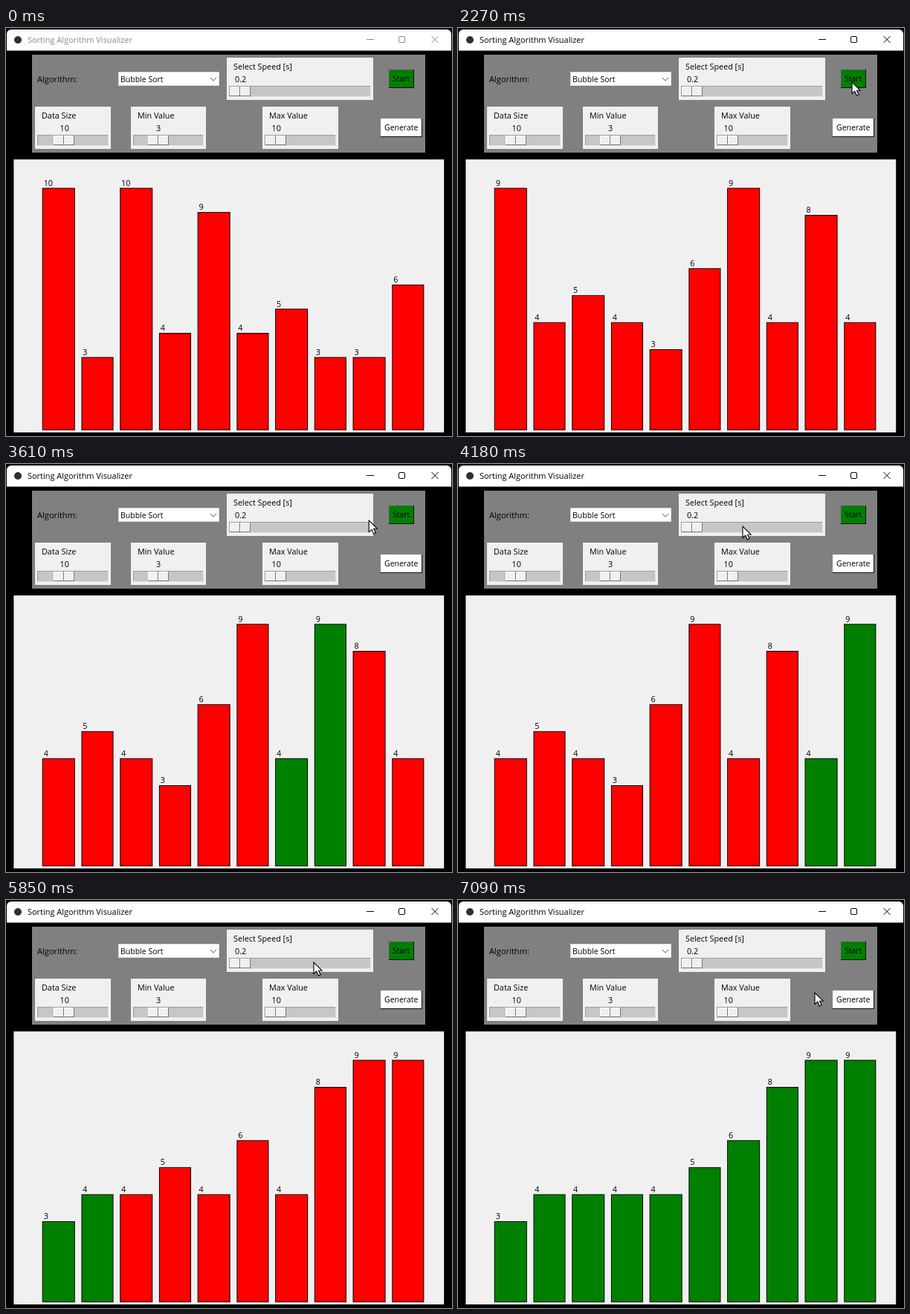
An HTML page with a canvas that plays this animation: 600x550 px, repeating every 7.18 s.

```html
<!DOCTYPE html>
<html lang="en">
<head>
<meta charset="utf-8">
<title>Sorting Algorithm Visualizer</title>
<style>
  html, body { margin: 0; width: 100%; height: 100%; overflow: hidden; background: #000; }
  canvas { display: block; width: 600px; height: 550px; }
</style>
</head>
<body>
<canvas id="stage" width="600" height="550"></canvas>
<script>
const ctx = document.getElementById('stage').getContext('2d');
const LOOP = 7180;
const FACE = '#f0f0f0';

const FIRST = [10, 3, 10, 4, 9, 4, 5, 3, 3, 6];
const SECOND = [10, 10, 7, 5, 9, 5, 3, 3, 9, 10];
const THIRD = [9, 4, 5, 4, 3, 6, 9, 4, 8, 4];

// Release times of the button clicks
const HOLD = 120;
const GENERATE = [1110, 1580];
const START = [2580];
const TICK = 204;
const DONE_AT = 6740;

// Pointer stops: arrival time and place, each reached by one eased move
const TRAVEL = 600;
const STOPS = [
  { at: 0, x: 552, y: 570 },
  { at: 800, x: 532, y: 133 },
  { at: 2250, x: 530, y: 73 },
  { at: 4000, x: 383, y: 84 },
  { at: 4960, x: 414, y: 84 },
  { at: 6600, x: 480, y: 125 }
];

const steps = buildSteps();

function buildSteps() {
  const list = [
    { at: 0, data: FIRST },
    { at: GENERATE[0], data: SECOND },
    { at: GENERATE[1], data: THIRD }
  ];
  const data = THIRD.slice();
  let at = START[0];
  for (let pass = 1; pass < data.length; pass++) {
    for (let j = 0; j < data.length - 1; j++) {
      if (data[j] > data[j + 1]) {
        [data[j], data[j + 1]] = [data[j + 1], data[j]];
        list.push({ at, data: data.slice(), pair: j });
        at += TICK;
      }
    }
  }
  list.push({ at: DONE_AT, data, done: true });
  return list;
}

function box(x, y, r, b, color) {
  ctx.fillStyle = color;
  ctx.fillRect(x, y, r - x, b - y);
}

function text(str, x, y, color = '#000', size = 10.8) {
  ctx.font = `${size}px "Open Sans", "Noto Sans", sans-serif`;
  ctx.fillStyle = color;
  ctx.fillText(str, x, y);
}

function lines(color, ...paths) {
  ctx.strokeStyle = color;
  ctx.lineWidth = 1;
  ctx.beginPath();
  for (const [start, ...rest] of paths) {
    ctx.moveTo(...start);
    rest.forEach(p => ctx.lineTo(...p));
  }
  ctx.stroke();
}

// Rectangle with a top-left and a bottom-right edge colour
function bevel(x, y, r, b, fill, light, dark) {
  box(x, y, r, b, dark);
  box(x, y, r - 1, b - 1, light);
  box(x + 1, y + 1, r - 1, b - 1, fill);
}

function titleBar(active) {
  ctx.fillStyle = '#fff';
  ctx.beginPath();
  ctx.roundRect(1, 2, 598, 28.5, [6, 6, 0, 0]);
  ctx.fill();

  ctx.fillStyle = '#27313b';
  ctx.beginPath();
  ctx.arc(16, 16, 5, 0, Math.PI * 2);
  ctx.fill();

  const ink = active ? '#000' : '#8a8a8a';
  text('Sorting Algorithm Visualizer', 29, 20, ink, 10.95);
  lines(ink, [[485, 15.5], [495, 15.5]],
    [[572.5, 11], [581.5, 20]], [[581.5, 11], [572.5, 20]]);
  ctx.beginPath();
  ctx.roundRect(528.5, 11.5, 8, 8, 1.5);
  ctx.stroke();
}

function scale(x, y, r, label, value, valueX, thumb) {
  box(x, y, r, y + 57, FACE);
  text(label, x + 9, y + 16);
  text(value, valueX, y + 33);
  bevel(x + 3, y + 38, r - 3, y + 53, '#c6c6c6', '#9c9c9c', '#e2e2e2');
  for (const side of [0, 14]) {
    bevel(thumb + side, y + 39, thumb + side + 14, y + 52, FACE, '#fff', '#777');
  }
}

function button(x, y, r, b, label, color, light, pressed) {
  if (pressed) bevel(x, y, r, b, FACE, '#696969', '#fff');
  else bevel(x, y, r, b, color, light, '#101010');
  const shift = pressed ? 1 : 0;
  text(label, x + 5 + shift, y + 16 + shift, '#000', 10.5);
}

function controls(t) {
  const held = ups => ups.some(up => t >= up - HOLD && t < up);
  box(35, 36, 564, 168, '#808080');
  text('Algorithm:', 42, 73, '#000', 11.1);
  box(151, 59, 287, 78, '#d9d9d9');
  box(152, 60, 286, 77, '#fff');
  text('Bubble Sort', 154, 73, '#000', 10.5);
  lines('#555', [[275, 67], [279, 71], [283, 67]]);

  scale(297, 40, 494, 'Select Speed [s]', '0.2', 308, 301);
  scale(39, 106, 141, 'Data Size', '10', 72.5, 64);
  scale(168, 106, 269, 'Min Value', '3', 202, 191);
  scale(345, 106, 447, 'Max Value', '10', 357.5, 349);
  button(515, 56, 549, 81, 'Start', '#008000', '#406040', held(START));
  button(504, 122, 560, 147, 'Generate', '#fff', '#fff', held(GENERATE));
}

// Drawn in the widget's own 604 by 384 units, shown slightly reduced
function chart({ data, pair, done }) {
  ctx.save();
  ctx.translate(10.4, 177.2);
  ctx.scale(0.9583, 0.9583);
  box(0, 0, 604, 384, FACE);
  const max = Math.max(...data);
  const pitch = 600 / (data.length + 1);
  data.forEach((v, i) => {
    const x = Math.round(i * pitch + 40);
    const r = Math.round((i + 1) * pitch + 30);
    const y = Math.round(380 - 340 * v / max);
    const green = done || i === pair || i === pair + 1;
    box(x, y, r + 1, 381, '#000');
    box(x + 1, y + 1, r, 380, green ? '#008000' : '#f00');
    text(String(v), x + 2, y - 3, '#000', 11.3);
  });
  ctx.restore();
}

function pointer(t) {
  const next = STOPS.findIndex(s => s.at > t);
  const b = STOPS[next] || STOPS[STOPS.length - 1];
  const a = STOPS[next - 1] || b;
  const k = Math.min(1, Math.max(0, 1 - (b.at - t) / TRAVEL));
  const ease = k * k * (3 - 2 * k);

  ctx.save();
  ctx.translate(a.x + (b.x - a.x) * ease, a.y + (b.y - a.y) * ease);
  ctx.beginPath();
  [[0, 0], [0, 15.5], [3.7, 12.2], [6.3, 18], [9, 16.8], [6.5, 11.2], [11, 11]]
    .forEach(p => ctx.lineTo(...p));
  ctx.closePath();
  ctx.fillStyle = '#fff';
  ctx.strokeStyle = '#000';
  ctx.lineWidth = 1.1;
  ctx.fill();
  ctx.stroke();
  ctx.restore();
}

const begin = performance.now();

function draw() {
  const t = (performance.now() - begin) % LOOP;
  box(0, 0, 600, 550, '#000');
  titleBar(t >= GENERATE[0] - HOLD);
  controls(t);
  chart(steps.filter(s => s.at <= t).pop());
  pointer(t);
  requestAnimationFrame(draw);
}
draw();
</script>
</body>
</html>
```
